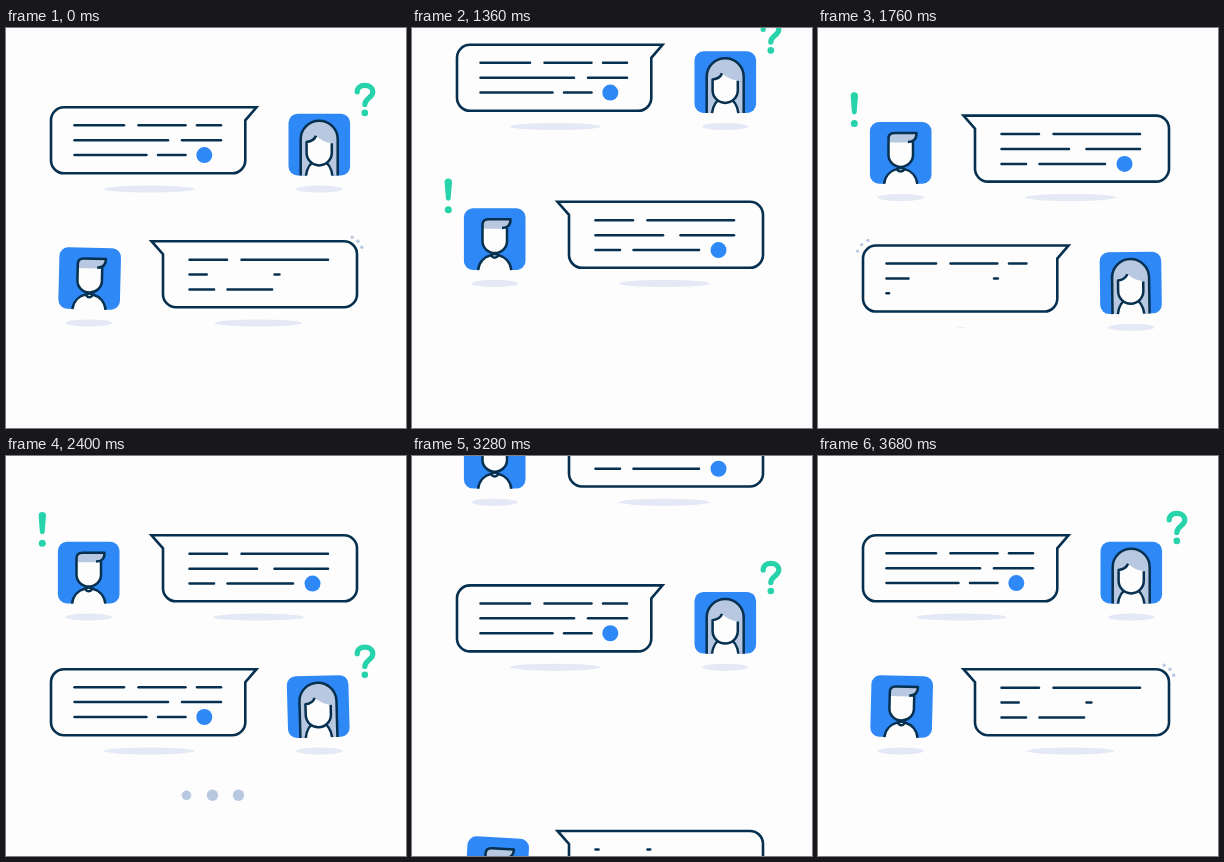
An HTML page for the animation above (3.72 s loop, 400 by 400 pixels).

```html
<!DOCTYPE html>
<html lang="en">
<head>
<meta charset="utf-8">
<title>Chat bubbles</title>
<style>
html, body { margin: 0; width: 100%; height: 100%; overflow: hidden; background: #fdfdfd; }
svg { display: block; width: 100vw; height: 100vh; }
.line { fill: none; stroke: #06304f; stroke-width: 2.5; stroke-linejoin: round; }
.text { stroke: #06304f; stroke-width: 2.5; stroke-linecap: round; }
.bubble { fill: #fdfdfd; stroke: #06304f; stroke-width: 2.6; }
.skin { fill: #fdfdfd; }
.hair { fill: #b9c8e1; }
.blue { fill: #2e88f6; }
.shade { fill: #e4e9f5; }
.teal { fill: #26d3aa; }
.mark { fill: none; stroke: #26d3aa; stroke-width: 5.2; stroke-linecap: round; }
</style>
</head>
<body>
<svg id="stage" viewBox="0 0 400 400"></svg>
<script>
const LOOP = 3720, CYCLE = 3680, HALF = CYCLE / 2, STEP = 40;
const stage = document.getElementById('stage');

const span = (t, start, dur) => Math.max(0, Math.min(1, (t - start) / dur));
const inOut = x => x < .5 ? 2 * x * x : 1 - 2 * (1 - x) ** 2;
const back = x => x <= 0 ? 0 : 1 + 2.7 * (x - 1) ** 3 + 1.7 * (x - 1) ** 2;
const ease = (t, start, dur) => inOut(span(t, start, dur));

// Time 0 is when a row rests in the lower place. Each scroll is one big move and a short settle.
function rowY(t) {
  const enter = 488 * (1 - ease(t, -640, 400)) + 5.6 * (1 - ease(t, -120, 120));
  const rise = 123.2 * ease(t, HALF - 640, 400) + 10.7 * ease(t, HALF - 120, 120);
  const leave = 267 * span(t, CYCLE - 705, 465) ** 2;
  return 213.2 + enter - rise - leave;
}

const tilt = t => 3.4 * (1 - ease(t, -480, 480)) + 2.8 * Math.sin(Math.PI * span(t, -140, 860));

const body = (x, r) => `
  <path class="skin" d="M${x - r} 69a${r} 15.5 0 0 1 ${2 * r} 0z"/>
  <path class="line" d="M${x - r} 68.3C${x - r + 1} 60 ${x - r * .6} 55 ${x - 4} 53.5
    q4 5 8 0C${x + r * .6} 55 ${x + r - 1} 60 ${x + r} 68.3"/>
  <path class="line" d="M${x - 4} 53.5q4-2.5 8 0"/>`;

// Text rows are [start, gap, [x, width], ...].
const her = {
  shift: HALF, dir: -1, x: 313.3,
  bubble: 'M58 0H250.5L239.3 13V53a13 13 0 0 1-13 13H58a13 13 0 0 1-13-13V13A13 13 0 0 1 58 0z',
  textY: 18,
  text: [
    [-440, 92, [68.5, 49.5], [132.5, 47], [191, 24]],
    [-176, 34, [68.5, 93.5], [176, 39]],
    [-117, 47, [68.5, 72], [152, 27.5]]
  ],
  dot: 198.3, dotAt: 10, shade: 143.3, shadeAt: -138, spark: 58, sparkAt: -165,
  face: `<path class="hair" d="M294.7 68.3V32a18.5 18.5 0 0 1 37 0V68.3z"/>
    ${body(313.2, 13.2)}
    <path class="skin" d="M300.6 36Q308 34 310 28.5Q316 34.5 325.8 36V45.5a12.6 12.6 0 0 1-25.2 0z"/>
    <path class="line" d="M294.7 68.3V32a18.5 18.5 0 0 1 37 0V68.3"/>
    <path class="line" d="M310 28.5Q308 34 300.6 34.7V45.5a12.6 12.6 0 0 0 25.2 0V36"/>`,
  mark: `<path class="mark" d="M351.2-15.5C351.2-19.8 354.5-22 358.8-22
    C363.6-22 366.8-19.3 366.8-15.3C366.8-9.5 358.8-9 358.8-2.8"/>
    <circle class="teal" cx="358.8" cy="5.6" r="3.3"/>`,
  markX: 359
};

const him = {
  shift: 0, dir: 1, x: 82.7,
  bubble: 'M145.5 0H338a13 13 0 0 1 13 13V53a13 13 0 0 1-13 13H170a13 13 0 0 1-13-13V13z',
  textY: 18.5,
  text: [
    [-456, 21, [183.5, 37.5], [235.5, 86.5]],
    [-100, 40, [183.5, 67.5], [268.5, 53.5]],
    [-280, 112, [183.5, 24.5], [221.5, 65.5]]
  ],
  dot: 306.5, dotAt: 0, shade: 252.5, shadeAt: -210, spark: 338.5, sparkAt: -64,
  face: `${body(82.7, 16.6)}
    <path class="skin" d="M70.5 24H95V39.5a12.25 11.8 0 0 1-24.5 0z"/>
    <path class="hair" d="M70.5 27V23q0-5.5 6-5.5H98.5q0 7.5-5.5 8.5L90 27z"/>
    <path class="line" d="M95 26V39.5a12.25 11.8 0 0 1-24.5 0V23q0-5.5 6-5.5H98.5q.3 8.5-8.5 8.8"/>`,
  mark: `<path class="teal" d="M32.6-19.6a3.7 3.7 0 0 1 7.4 0L38.7-3.5a2.4 2.4 0 0 1-4.8 0z"/>
    <circle class="teal" cx="36.3" cy="7.9" r="3.5"/>`,
  markX: 36.5
};

function add(html, parent = stage) {
  const g = document.createElementNS('http://www.w3.org/2000/svg', 'g');
  g.innerHTML = html;
  return parent.appendChild(g);
}

function set(el, attrs) {
  for (const k in attrs) el.setAttribute(k, attrs[k]);
}

function makeRow(who, delay) {
  const segments = who.text.flatMap(([start, gap, ...parts], row) =>
    parts.map(([x, width], i) => ({ x, width, y: who.textY + 14.9 * row, start: start + gap * i })));

  const root = add('');
  const shades = add([who.shade, who.x].map(x =>
    `<ellipse class="shade" cx="${x}" cy="81.8"/>`).join(''), root).children;
  add(`<path class="bubble" d="${who.bubble}"/>`, root);
  const lines = add(segments.map(({ x, y }) =>
    `<line class="text" x1="${x}" y1="${y}" y2="${y}"/>`).join(''), root).children;
  const dot = add(`<circle class="blue" cx="${who.dot}" cy="${who.textY + 29.8}"/>`, root).firstChild;
  const sparks = [...add('<circle class="hair"/>'.repeat(3), root).children];
  const card = add(`<rect class="blue" x="${who.x - 30.8}" y="6.5" width="61.6" height="61.6" rx="9"/>${who.face}`, root);
  const mark = add(who.mark, root);

  function shadow(el, rx, grow) {
    set(el, { rx: rx * grow, ry: 3.5 * grow });
  }

  return phase => {
    const t = (phase - who.shift + CYCLE) % CYCLE - delay;
    const live = t >= -640 && t < CYCLE - 240;
    root.style.display = live ? '' : 'none';
    if (!live) return;

    set(root, { transform: `translate(0 ${rowY(t)})` });
    shadow(shades[0], 45.5, ease(t, who.shadeAt, 240));
    shadow(shades[1], 23.3, ease(t, -420, 260));

    segments.forEach(({ x, width, start }, i) => {
      const p = ease(t, start, 280);
      set(lines[i], { x2: x + width * p, visibility: p > 0 ? 'visible' : 'hidden' });
    });
    set(dot, { r: Math.max(0, 8 * back(span(t, who.dotAt, 240))) });

    // Sparks fly from the bubble's outer top corner.
    const s = span(t, who.sparkAt, 320), reach = 14 + 13 * s * (2 - s);
    sparks.forEach((el, i) => {
      const a = (-66 + 22 * i) * Math.PI / 180;
      set(el, {
        cx: who.spark + who.dir * reach * Math.cos(a),
        cy: 13 + reach * Math.sin(a),
        r: s > 0 ? 1.7 * (1 - s ** 3) : 0
      });
    });

    set(card, { transform: `rotate(${who.dir * tilt(t)} ${who.x} 78)` });

    const w = span(t, 280, 680), swing = who === him ? 4 * w * Math.sin(w * Math.PI) : 0;
    const size = Math.max(0, back(span(t, 280, 280)));
    set(mark, {
      transform: `translate(${who.markX} -7) rotate(${swing}) scale(${size}) translate(${-who.markX} 7)`,
      visibility: size > 0 ? 'visible' : 'hidden'
    });
  };
}

// Two copies of each row, so one can leave while the next arrives.
const rows = [her, him].flatMap(who => [makeRow(who, 0), makeRow(who, CYCLE)]);
const dots = [...add([0, 1, 2].map(i =>
  `<circle class="hair" cx="${180.5 + 26 * i}" cy="339.3"/>`).join('')).children];

function draw(ms) {
  const phase = Math.floor(ms % LOOP / STEP) * STEP % CYCLE;
  rows.forEach(row => row(phase));
  dots.forEach((el, i) => {
    const t = phase % HALF - 80 * i;
    set(el, { r: 5.7 * ease(t, 160, 140) * (1 - ease(t, 520, 140)) });
  });
}

const begin = performance.now();
function tick() {
  draw(performance.now() - begin);
  requestAnimationFrame(tick);
}
tick();
</script>
</body>
</html>
```
